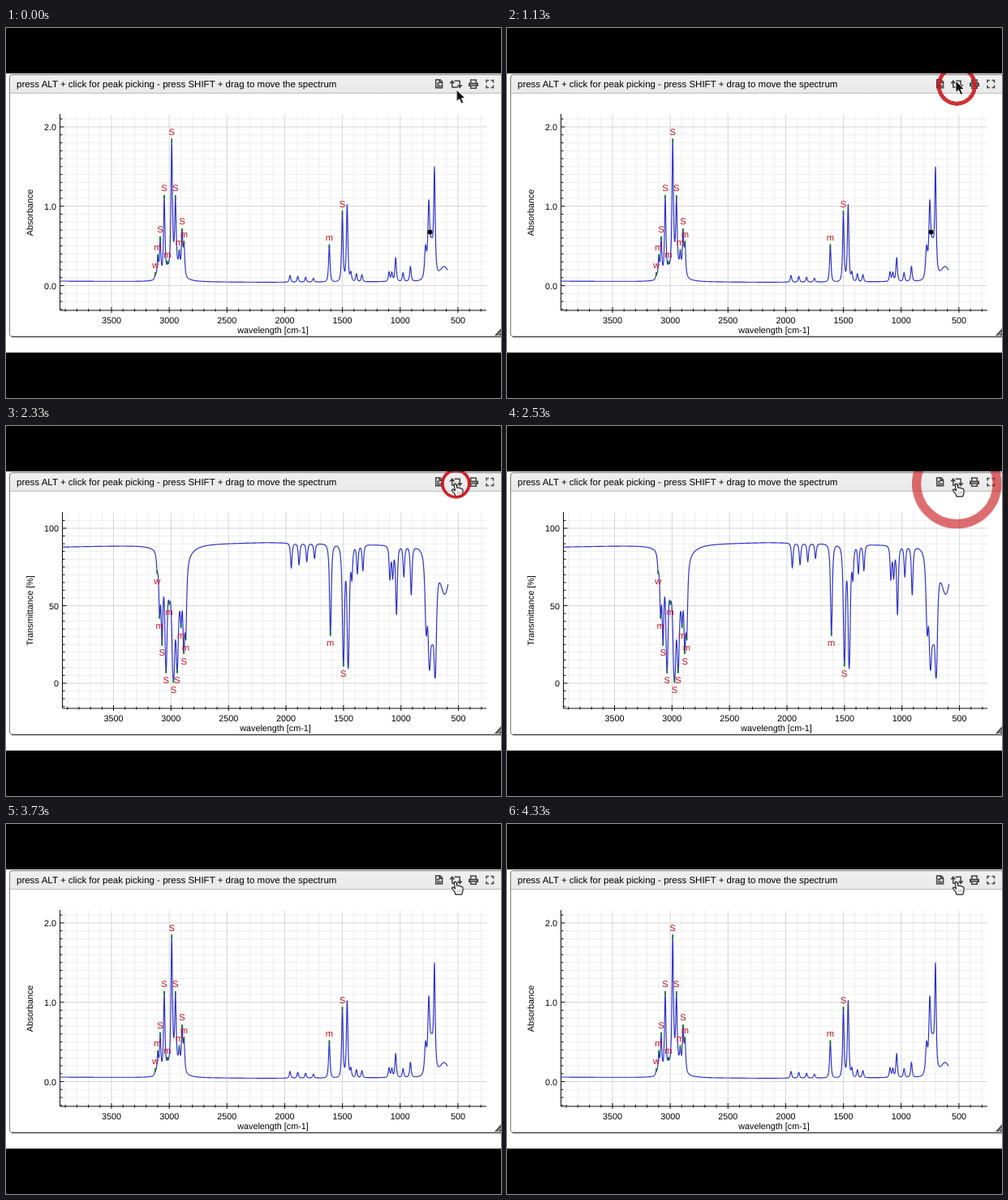
Recreate the animation shown at these times as an HTML page. Size 610 by 456 pixels, loop 4.87 s.

```html
<!DOCTYPE html>
<html lang="en">
<head>
<meta charset="utf-8">
<title>Spectrum viewer</title>
<style>
html, body { margin: 0; width: 100%; height: 100%; overflow: hidden; background: #000; }
svg { display: block; width: 610px; height: 456px; }
text {
  font-family: "Liberation Sans", Arial, Helvetica, sans-serif;
  font-size: 10.8px; fill: #000; text-rendering: geometricPrecision;
}
.title { font-size: 11.5px; }
.mid { text-anchor: middle; }
.end { text-anchor: end; }
.peak { font-size: 11.2px; fill: #c8141e; text-anchor: middle; }
.minor { stroke: #eee; }
.major { stroke: #d6d6d6; }
.axis { stroke: #111; fill: none; }
.curve { stroke: #2a2fc8; stroke-width: 1.15; fill: none; stroke-linejoin: round; }
.mark { stroke: #0a7a20; stroke-width: 1.8; }
.icon { stroke: #444; stroke-width: 1.5; fill: none; }

#absorb, #trans, #dot, #arrow, #hand { animation: 4870ms step-end infinite; }
#absorb { animation-name: absorb; }
#trans { animation-name: trans; }
#dot { animation-name: dot; }
#hand { animation-name: hand; }
#arrow { animation-name: move, arrow; }

/* One click ring, started three times; it grows at 15 steps per second. */
.ring {
  fill: none; stroke: #c9181e; stroke-width: 4; opacity: 0;
  animation: grow 4870ms var(--at) infinite, fade 4870ms var(--at) infinite;
}

@keyframes absorb { 0%, 76.591% { visibility: visible } 43.737% { visibility: hidden } }
@keyframes trans { 0%, 76.591% { visibility: hidden } 43.737% { visibility: visible } }
@keyframes dot { 0% { visibility: visible } 43.737%, 100% { visibility: hidden } }
@keyframes arrow { 0% { visibility: visible } 26.01%, 100% { visibility: hidden } }
@keyframes hand { 0% { visibility: hidden } 26.01%, 100% { visibility: visible } }
@keyframes move {
  0% { transform: translate(555.2px, 76px); animation-timing-function: steps(6, end) }
  8.2%, 100% { transform: translate(553px, 65px) }
}
@keyframes grow {
  0% { transform: scale(var(--from)); animation-timing-function: steps(7, end) }
  9.63%, 100% { transform: scale(calc(var(--from) + 4.3)) }
}
@keyframes fade {
  0% { opacity: 1; animation-timing-function: ease-in }
  9.62% { opacity: .1 }
  9.63%, 100% { opacity: 0 }
}
</style>
</head>
<body>
<svg viewBox="0 0 610 456">
  <defs>
    <linearGradient id="bar" x2="0" y2="1">
      <stop offset="0" stop-color="#f0f0f0"/><stop offset="1" stop-color="#e9e9e9"/>
    </linearGradient>
    <clipPath id="view"><rect y="56" width="610" height="344"/></clipPath>
  </defs>
  <rect width="610" height="456"/>
  <g clip-path="url(#view)">
    <rect y="56" width="610" height="344" fill="#fff"/>
    <path d="M4.5 80V61q0-3.5 3.5-3.5H612V80z" fill="url(#bar)"/>
    <path d="M612 57.5H8q-3.5 0-3.5 3.5V377q0 3.5 3.5 3.5" fill="none" stroke="#777"/>
    <path d="M5 80.3H610" stroke="#bbb"/>
    <path d="M7 380.4H610" stroke="#444" stroke-width="1.5"/>
    <path d="M610 370V379H602z" fill="#555"/>
    <path d="M606 379L610 374.5" stroke="#ddd"/>
    <text class="title" x="13" y="73.2">press ALT + click for peak picking - press SHIFT + drag to move the spectrum</text>

    <g class="icon">
      <path d="M529.7 63.7H535L537.6 66.3V73.8H529.7z"/>
      <path d="M534.3 63.7V67H537.6M531 68.5H534M531 71.5H536.5" stroke-width="1.8"/>
      <path d="M549.8 66V73H557M552.5 65.2H559.2V72"/>
      <path d="M546.3 68.2L549.8 64L553.3 68.2zM555.7 70.2L559.2 74.4L562.7 70.2z" fill="#444" stroke="none"/>
      <path d="M572.7 68V63.9H579.3V68M572.7 71H579.3V74.2H572.7z"/>
      <path d="M571 72V68.5H581V72" stroke-width="2"/>
      <path d="M592 67.5V64.5H595M597.5 64.5H600.5V67.5M600.5 70.5V73.5H597.5M595 73.5H592V70.5"/>
    </g>

    <g id="absorb"></g>
    <g id="trans"></g>
    <circle id="dot" cx="522.5" cy="251.5" r="3"/>

    <path id="arrow" d="M0 0V14.6L3.4 11.5L6 17.3L8.7 16.1L6.2 10.5H10.6z" fill="#111" stroke="#fff" stroke-width=".9"/>
    <g id="hand" transform="translate(.5 .8)" fill="#fff" stroke="#222" stroke-width="1.2" stroke-linejoin="round">
      <path d="M553.3 86L552.6 83L549.2 78.8Q548.6 77 550.4 77L553 79L551.7 71.6Q552 69.6 553.9 70.6L555.4 75.6Q556.6 74.5 557.8 75.7Q559.2 75 560.2 76.4Q562.2 76 562.5 78V82L561.2 86z"/>
      <path d="M556.2 79.5V83M558.3 79.5V83M560.3 79.5V83" stroke="#999" stroke-width=".8"/>
    </g>
    <g transform="translate(554.3 71)">
      <circle class="ring" r="18" style="--at: 995ms; --from: 0"/>
      <circle class="ring" r="18" style="--at: 2259ms; --from: .3"/>
      <circle class="ring" r="18" style="--at: 3859ms; --from: .3"/>
    </g>
  </g>
</svg>
<script>
const band = (x, height, width = 1.35) => ({ x, height, width });
const series = (count, x, gap, height, drop) =>
  Array.from({ length: count }, (_, i) => band(x + i * gap, height - i * drop));

const picked = [
  band(184, .05), band(187, .25), band(190, .47), band(195, .98), band(199, .06),
  band(204.2, 1.57), band(208.8, .83), band(213.5, .2), band(217, .5), band(219.4, .36),
  band(398.4, .45), band(414.5, .86)
];
const bands = [
  ...picked,
  band(207, .2, 12),                  // foot of the main group
  ...series(4, 350, 9.6, .085, .012), // overtones
  band(420.4, .97),
  ...series(3, 425, 6.8, .11, .01),
  ...series(2, 472, 3.5, .12, .01),
  band(480.2, .3), band(489.3, .11), band(498.4, .19),
  band(517, .37, 1.8), band(521, .84, 1.7), band(524.5, .4, 3.5), band(528, 1.25),
  band(540, .18, 9)
];
const baseline = x => .042 + .014 * Math.abs(x - 320) / 250;
const absorbance = x => bands.reduce(
  (sum, b) => sum + b.height / (1 + ((x - b.x) / b.width) ** 2) ** 1.5, baseline(x));
const strength = h => h > .46 ? "S" : h > .055 ? "m" : "w";

const line = (cls, x1, y1, x2, y2) =>
  `<line class="${cls}" x1="${x1}" y1="${y1}" x2="${x2}" y2="${y2}"/>`;
const label = (cls, x, y, s) => `<text class="${cls}" x="${x}" y="${y}">${s}</text>`;

function draw(id, o) {
  const waveX = w => o.x3500 + (3500 - w) * o.xScale;
  const valueY = v => o.y0 - v * o.yScale;
  const mapX = x => o.x3500 + (x - 130) * o.xScale / .1423;
  const curveY = x => valueY(o.value(absorbance(x)));
  let minor = "", major = "", marks = "";

  for (let w = 3900; w >= 300; w -= 100) {
    const x = waveX(w), big = w % 500 === 0;
    const grid = line(big ? "major" : "minor", x, 107, x, 348);
    if (big) major += grid; else minor += grid;
    marks += line("axis", x, big ? 344 : 346, x, big ? 351 : 349.5);
    if (big) marks += label("mid", x, 363.5, w);
  }
  for (let i = -3; i <= 21; i++) {
    const y = valueY(i * o.step), big = i % 10 === 0;
    const grid = line(big ? "major" : "minor", o.left, y, 592, y);
    if (big) major += grid; else minor += grid;
    marks += line("axis", o.left, y, o.left + (big ? 5 : 3), y);
    if (big) marks += label("end", o.left - 4.5, y + 4, o.format(i * o.step));
  }

  const points = [];
  for (let x = 67; x <= 544; x += .25) {
    points.push(mapX(x).toFixed(2) + "," + curveY(x).toFixed(2));
  }
  const tags = picked.map(({ x, height }) => {
    const px = mapX(x), y = curveY(x) + o.labelAt;
    return line("mark", px, y + o.markAt, px, y + o.markAt + 4.5) +
      label("peak", px, y, strength(height));
  }).join("");

  document.getElementById(id).innerHTML = minor + major + marks +
    `<path class="axis" d="M${o.left} 106V348H592"/>` +
    label("mid", o.left + 262.5, 376, "wavelength [cm-1]") +
    `<text class="mid" transform="translate(32.5 227.5) rotate(-90)">${o.title}</text>` +
    `<polyline class="curve" points="${points.join(" ")}"/>` + tags;
}

draw("absorb", {
  title: "Absorbance", left: 66.5, x3500: 130, xScale: .1423, y0: 317.5, yScale: 97.8,
  step: .1, format: v => v.toFixed(1), labelAt: -7, markAt: 4.5, value: a => a
});
draw("trans", {
  title: "Transmittance [%]", left: 69.5, x3500: 132.5, xScale: .1417, y0: 317, yScale: 1.91,
  step: 5, format: v => v, labelAt: 15, markAt: -17, value: a => 100 * 10 ** -a
});
</script>
</body>
</html>
```
